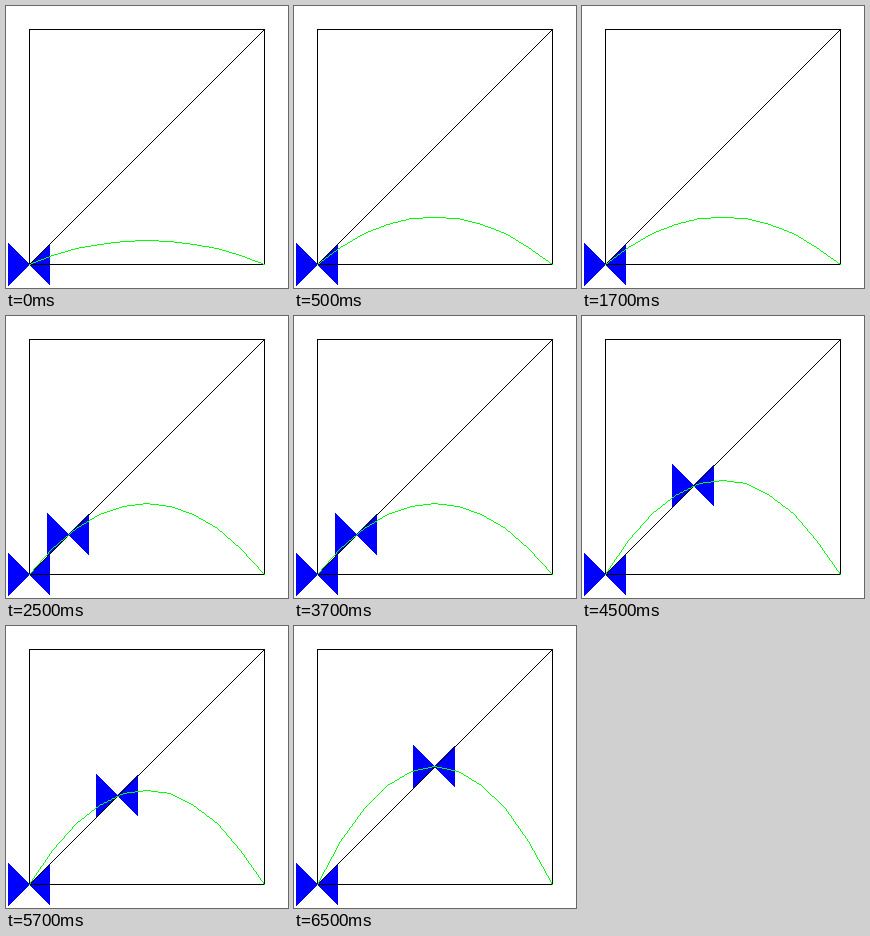
These frames come from a looping animation (282x282 px, 8 s). A matplotlib script:

```python
import numpy as np
import matplotlib.pyplot as plt
from matplotlib.animation import FuncAnimation

SIZE, LEFT, SPAN = 282, 23, 235
BASE = LEFT + SPAN
TIE = 21
BLACK, BLUE, GREEN = (0, 0, 0), (0, 0, 255), (0, 255, 0)
RATES = (0.4, 0.8, 1.2, 1.6, 2.0)
STEP_MS = 500
ROWS, COLS = np.mgrid[:SIZE, :SIZE]


def to_pixel(x, y):
    return (int(np.floor(LEFT + SPAN * x + 1e-6)),
            int(np.floor(BASE - SPAN * y + 1e-6)))


def draw_path(canvas, points, color):
    """Join unit-square points with one-pixel hard-edged lines."""
    pixels = [to_pixel(x, y) for x, y in points]
    for (x0, y0), (x1, y1) in zip(pixels, pixels[1:]):
        n = max(abs(x1 - x0), abs(y1 - y0)) + 1
        xs = np.rint(np.linspace(x0, x1, n)).astype(int)
        ys = np.rint(np.linspace(y0, y1, n)).astype(int)
        canvas[ys, xs] = color


def draw_tie(canvas, value):
    """Bow tie centred on a fixed point of the map."""
    cx, cy = to_pixel(value, value)
    dx = COLS - cx
    inside = (dx >= -TIE) & (dx < TIE) & (abs(ROWS - cy) <= abs(dx))
    canvas[inside] = BLUE


def render(rate):
    canvas = np.full((SIZE, SIZE, 3), 255, np.uint8)
    draw_tie(canvas, 0)
    if rate > 1:
        draw_tie(canvas, 1 - 1 / rate)
    draw_path(canvas, [(0, 0), (1, 0), (1, 1), (0, 1), (0, 0)], BLACK)
    draw_path(canvas, [(0, 0), (1, 1)], BLACK)
    xs = np.linspace(0, 1, 11)
    draw_path(canvas, list(zip(xs, rate * xs * (1 - xs))), GREEN)
    return canvas


fig = plt.figure(figsize=(3, 3), dpi=94)
ax = fig.add_axes([0, 0, 1, 1])
ax.axis("off")
picture = ax.imshow(render(RATES[0]), interpolation="nearest", aspect="auto")


def update(k):
    # The first rate shows for one step, the others for four.
    picture.set_data(render(RATES[(k + 3) // 4]))
    return (picture,)


anim = FuncAnimation(fig, update, frames=16, interval=STEP_MS, repeat=True,
                     repeat_delay=0)
plt.show()
```
